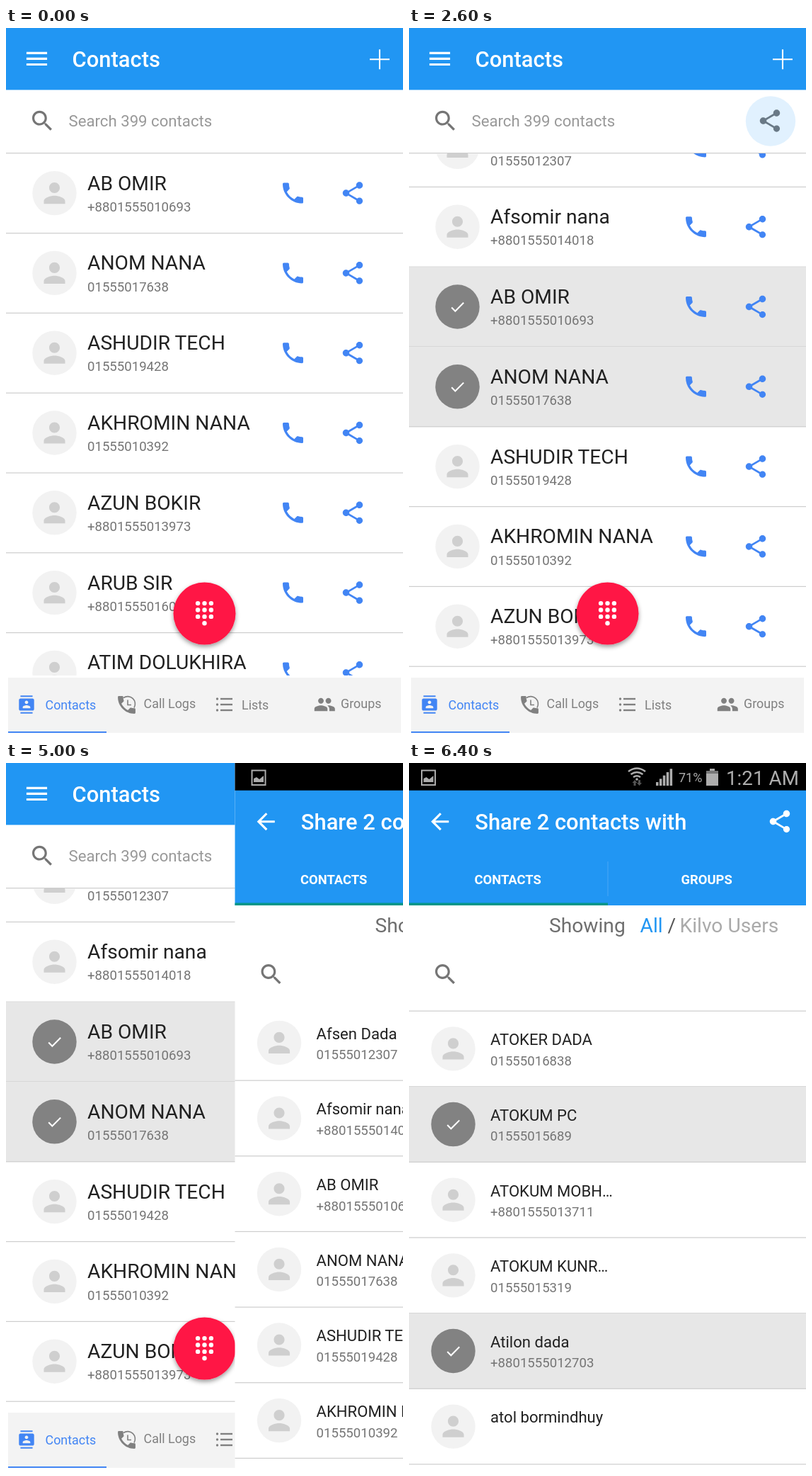
Animation of 561x998 px, one loop 6800 ms. Source, as an HTML page:

```html
<!DOCTYPE html>
<html lang="en">
<head>
<meta charset="utf-8">
<title>Share contacts</title>
<style>
  html, body { margin: 0; width: 561px; height: 998px; overflow: hidden; background: #fff; }
  svg { display: block; font-family: Roboto, sans-serif; }
</style>
</head>
<body>
<svg id="stage" width="561" height="998" viewBox="0 0 561 998"></svg>
<script>
const BLUE = '#2196f3', LINK = '#4285f4', GREY = '#757575', STATUS = '#adadad';

// Icon outlines on a 24-unit grid
const ICON = {
  person: 'M12 12c2.21 0 4-1.79 4-4s-1.79-4-4-4-4 1.79-4 4 1.79 4 4 4zm0 2c-2.67 0-8 1.34-8 4v2h16v-2c0-2.66-5.33-4-8-4z',
  check: 'M9 16.2L4.8 12l-1.4 1.4L9 19 21 7l-1.4-1.4z',
  phone: 'M6.62 10.79c1.44 2.83 3.76 5.14 6.59 6.59l2.2-2.2c.27-.27.67-.36 1.02-.24 1.12.37 2.33.57 3.57.57.55 0 1 .45 1 1V20c0 .55-.45 1-1 1-9.39 0-17-7.61-17-17 0-.55.45-1 1-1h3.5c.55 0 1 .45 1 1 0 1.25.2 2.45.57 3.57.11.35.03.74-.25 1.02z',
  share: 'M18 16.08c-.76 0-1.44.3-1.96.77L8.91 12.7c.05-.23.09-.46.09-.7s-.04-.47-.09-.7l7.05-4.11c.54.5 1.25.81 2.04.81 1.66 0 3-1.34 3-3s-1.34-3-3-3-3 1.34-3 3c0 .24.04.47.09.7L8.04 9.81C7.5 9.31 6.79 9 6 9c-1.66 0-3 1.34-3 3s1.34 3 3 3c.79 0 1.5-.31 2.04-.81l7.12 4.16c-.05.21-.08.43-.08.65 0 1.61 1.31 2.92 2.92 2.92s2.92-1.31 2.92-2.92-1.31-2.92-2.92-2.92z',
  search: 'M15.5 14h-.79l-.28-.27C15.41 12.59 16 11.11 16 9.5 16 5.91 13.09 3 9.5 3S3 5.91 3 9.5 5.91 16 9.5 16c1.61 0 3.09-.59 4.23-1.57l.27.28v.79l5 4.99L20.49 19l-4.99-5zm-6 0C7.01 14 5 11.99 5 9.5S7.01 5 9.5 5 14 7.01 14 9.5 11.99 14 9.5 14z',
  menu: 'M3 18h18v-2H3zm0-5h18v-2H3zm0-7v2h18V6z',
  back: 'M20 11H7.83l5.59-5.59L12 4l-8 8 8 8 1.41-1.41L7.83 13H20z',
  book: 'M20 0H4v2h16zM4 24h16v-2H4zM20 4H4c-1.1 0-2 .9-2 2v12c0 1.1.9 2 2 2h16c1.1 0 2-.9 2-2V6c0-1.1-.9-2-2-2zm-8 2.75c1.24 0 2.25 1.01 2.25 2.25s-1.01 2.25-2.25 2.25S9.75 10.24 9.75 9 10.76 6.75 12 6.75zM17 17H7v-1.5c0-1.67 3.33-2.5 5-2.5s5 .83 5 2.5z',
  people: 'M16 11c1.66 0 3-1.34 3-3s-1.34-3-3-3-3 1.34-3 3 1.34 3 3 3zm-8 0c1.66 0 3-1.34 3-3S9.66 5 8 5 5 6.34 5 8s1.34 3 3 3zm0 2c-2.33 0-7 1.17-7 3.5V19h14v-2.5c0-2.33-4.67-3.5-7-3.5zm8 0c-.29 0-.62.02-.97.05 1.16.84 1.97 1.97 1.97 3.45V19h6v-2.5c0-2.33-4.67-3.5-7-3.5z'
};

const icon = (name, cx, cy, scale, fill) =>
  `<path d="${ICON[name]}" fill="${fill}" transform="translate(${cx} ${cy}) scale(${scale}) translate(-12 -12)"/>`;
const rect = (x, y, w, h, fill) => `<rect x="${x}" y="${y}" width="${w}" height="${h}" fill="${fill}"/>`;
const dot = (cx, cy, r, fill, more = '') => `<circle cx="${cx}" cy="${cy}" r="${r}" fill="${fill}" ${more}/>`;
const text = (s, x, y, size, fill, weight = 400) =>
  `<text x="${x}" y="${y}" font-size="${size}" fill="${fill}" font-weight="${weight}">${s}</text>`;
const stroke = (d, color, width) => `<path d="${d}" fill="none" stroke="${color}" stroke-width="${width}"/>`;
const shifted = (x, content) => `<g transform="translate(${x} 0)">${content}</g>`;

const people = [
  ['Afsen Dada', '01555012307'],
  ['Afsomir nana', '+8801555014018'],
  ['AB OMIR', '+8801555010693'],
  ['ANOM NANA', '01555017638'],
  ['ASHUDIR TECH', '01555019428'],
  ['AKHROMIN NANA', '01555010392'],
  ['AZUN BOKIR', '+8801555013973'],
  ['ARUB SIR', '+8801555016020'],
  ['ATIM DOLUKHIRA', '01555018244']
];
const laterPeople = [
  ['ATOKER DADA', '01555016838'],
  ['ATOKUM PC', '01555015689'],
  ['ATOKUM MOBH…', '+8801555013711'],
  ['ATOKUM KUNR…', '01555015319'],
  ['Atilon dada', '+8801555012703'],
  ['atol bormindhuy', '']
];

const homeLayout = { pitch: 112.8, avatarX: 68.5, mid: 56.3, nameDy: -4.6, nameSize: 28.2, numberDy: 25.6, actions: true };
const shareLayout = { pitch: 106.65, avatarX: 62.5, mid: 53.4, nameDy: -5.2, nameSize: 22.1, numberDy: 23.4 };

function list(rows, top, layout, picked = []) {
  const L = layout;
  return rows.map(([name, number], i) => {
    const y = top + i * L.pitch, cy = y + L.mid, on = picked.includes(i);
    return (on ? rect(0, y, 561, L.pitch, '#e7e7e7') : '') +
      rect(0, y + L.pitch - .6, 561, 1.2, '#cdcdcd') +
      dot(L.avatarX, cy, 31.2, on ? '#828282' : '#f2f2f2') +
      (on ? icon('check', L.avatarX, cy + .3, 1.05, '#fff') : icon('person', L.avatarX, cy, 1.88, '#cfcfcf')) +
      text(name, 115, cy + L.nameDy, L.nameSize, '#212121') +
      text(number, 115, cy + L.numberDy, 18.6, GREY) +
      (L.actions ? icon('phone', 405.5, cy, 1.61, LINK) + icon('share', 490, cy, 1.58, LINK) : '');
  }).join('');
}

function dialButton() {
  const pitch = 9.4, x = 280.5, y = 812.1;
  let s = dot(x, 826.5, 44, '#ff1744', 'filter="url(#shadow)"');
  for (let i = 0; i < 9; i++) s += dot(x + (i % 3 - 1) * pitch, y + (i / 3 | 0) * pitch, 3.2, '#fff');
  return s + dot(x, y + 3 * pitch, 3.2, '#fff');
}

function tabBar() {
  const c = '#808080';
  return rect(0, 914, 561, 84, '#fff') + rect(3, 917, 555, 78, '#f3f3f3') + rect(3, 993, 139, 2, LINK) +
    icon('book', 29, 955, 1.07, LINK) + text('Contacts', 55.5, 961.5, 17.9, LINK) +
    icon('phone', 170.5, 955.5, 1.38, c) + stroke('M166 945.5a10.500 10.500 0 0 1 15 14', c, 1.6) +
    stroke('M172 948.5v7h5', c, 1.6) +
    text('Call Logs', 194.5, 960, 17.9, c) +
    [947, 955, 963].map(y => dot(298.5, y, 1.7, c) + rect(303, y - 1.2, 17, 2.4, c)).join('') +
    text('Lists', 333, 961.5, 17.9, c) +
    icon('people', 450.3, 955, 1.32, c) + text('Groups', 473, 960, 17.9, c);
}

const homePage = rect(0, 0, 561, 998, '#fff') +
  rect(0, 0, 561, 87.4, BLUE) + icon('menu', 43.5, 43.4, 1.62, '#fff') +
  text('Contacts', 93.5, 55, 30.9, '#fff', 500) +
  stroke('M514 44.3h28M528 30.3v28', '#fff', 2.1) +
  icon('search', 51.4, 131.2, 1.6, GREY) + text('Search 399 contacts', 88.5, 139, 22.2, '#999') +
  `<g id="bulkShare">${icon('share', 510, 131, 1.58, GREY)}${dot(511, 131.5, 35.2, BLUE, 'id="ripple"')}</g>` +
  rect(0, 176, 561, 1.2, '#cdcdcd') +
  `<g clip-path="url(#homeClip)">
    <g id="homeIdle">${list(people.slice(2), 176.8, homeLayout)}</g>
    <g id="homePicked">${list(people.slice(0, 7), 111.6, homeLayout, [2, 3])}</g>
  </g>` + dialButton() + tabBar();

function statusBar(percent, time, inset, full) {
  const bars = [0, 1, 2, 3, 4].map(i => rect(349 + i * 4.9, 27 - i * 4.7, 3.5, 5 + i * 4.7, STATUS)).join('');
  const weak = '<path d="M348 32h24V8z" fill="#4a4a4a"/><path d="M348 32h8v-8z" fill="#adadad"/>';
  const picture = stroke('M18 10.5h19v20.5h-19z', STATUS, 2) +
    `<path d="M20.500 27v-5l4-2 4 3 6-5v9z" fill="${STATUS}"/>`;
  const indicators =
    stroke('M310 12q12-9 24 0M313.500 16q8.500-6 17 0M317 20q5-3.500 10 0', STATUS, 2.6) +
    dot(322, 23, 1.8, STATUS) +
    '<path d="M315.500 28l3.500-4 3.500 4h-2v4h-3v-4zM322 28h2v-4h3v4h2l-3.500 4z" fill="#555"/>' +
    (full ? bars : weak) +
    text(percent, 381, 27, 18, STATUS) +
    rect(425, 8, 7, 3, full ? STATUS : '#555') + rect(420, 11, 17, 21, full ? STATUS : '#555') +
    (full ? rect(420, 11, 17, 4, '#777') : rect(420, 27, 17, 5, STATUS)) +
    text(time, 448, 31, 27.8, STATUS);
  return shifted(inset, picture) + shifted(-inset, indicators);
}

const sharePage = rect(0, 0, 561, 998, '#fff') + rect(0, 0, 561, 39, '#000') +
  rect(0, 38.7, 561, 162.3, BLUE) + icon('back', 43.7, 82.7, 1.57, '#fff') +
  text('Share 2 contacts with', 93.3, 94, 30.9, '#fff', 500) + icon('share', 524, 82.5, 1.58, '#fff') +
  text('CONTACTS', 92.5, 170.6, 18.4, '#fff', 700) + text('GROUPS', 384.5, 170.6, 18.4, '#fff', 700) +
  rect(280.5, 139, 1, 49, '#4aa8f5') + rect(0, 197.5, 281, 3.5, '#009688') +
  text('Showing', 198, 238.6, 28.2, '#6e6e6e') + text('All', 326.5, 238.6, 28.2, BLUE) +
  text('/', 365.5, 238.6, 28.2, '#555') + text('Kilvo Users', 382.5, 238.6, 28.2, '#aaa') +
  icon('search', 51.4, 298.5, 1.6, GREY) +
  `<g id="shareIdle">${statusBar('18%', '1:06 AM', 6, false)}${list(people.slice(0, 6), 341.5, shareLayout)}</g>
  <g id="sharePicked">${statusBar('71%', '1:21 AM', 0, true)}${rect(0, 349.5, 561, 1.2, '#cdcdcd')}
    ${list(laterPeople, 350, shareLayout, [1, 4])}</g>`;

document.getElementById('stage').innerHTML = `<defs>
    <clipPath id="homeClip"><path d="M0 177h561v737H0z"/></clipPath>
    <filter id="shadow" x="-20%" y="-20%" width="140%" height="140%">
      <feDropShadow dx="0" dy="3" stdDeviation="3" flood-color="#000" flood-opacity=".4"/>
    </filter>
  </defs>${homePage}<g id="sharePage">${sharePage}</g>`;

const el = id => document.getElementById(id);
const show = (id, on) => el(id).setAttribute('display', on ? 'inline' : 'none');

// Quick fade in, then a slow fade out
const rippleOpacity = t => t < 1200 ? Math.max(0, (t - 400) / 800) * .25 : Math.max(0, (4200 - t) / 3000) * .25;

function render(now) {
  const t = Math.floor(now % 6800 / 200) * 200;
  show('homeIdle', t < 400);
  show('homePicked', t >= 400);
  show('bulkShare', t >= 400);
  el('ripple').setAttribute('opacity', rippleOpacity(t));
  show('sharePage', t >= 4600);
  const x = Math.max(0, 485.3 * (5800 - t) / 1200);
  el('sharePage').setAttribute('transform', `translate(${x} 0)`);
  show('shareIdle', t < 6400);
  show('sharePicked', t >= 6400);
}

function loop() {
  render(performance.now());
  requestAnimationFrame(loop);
}
loop();
</script>
</body>
</html>
```
